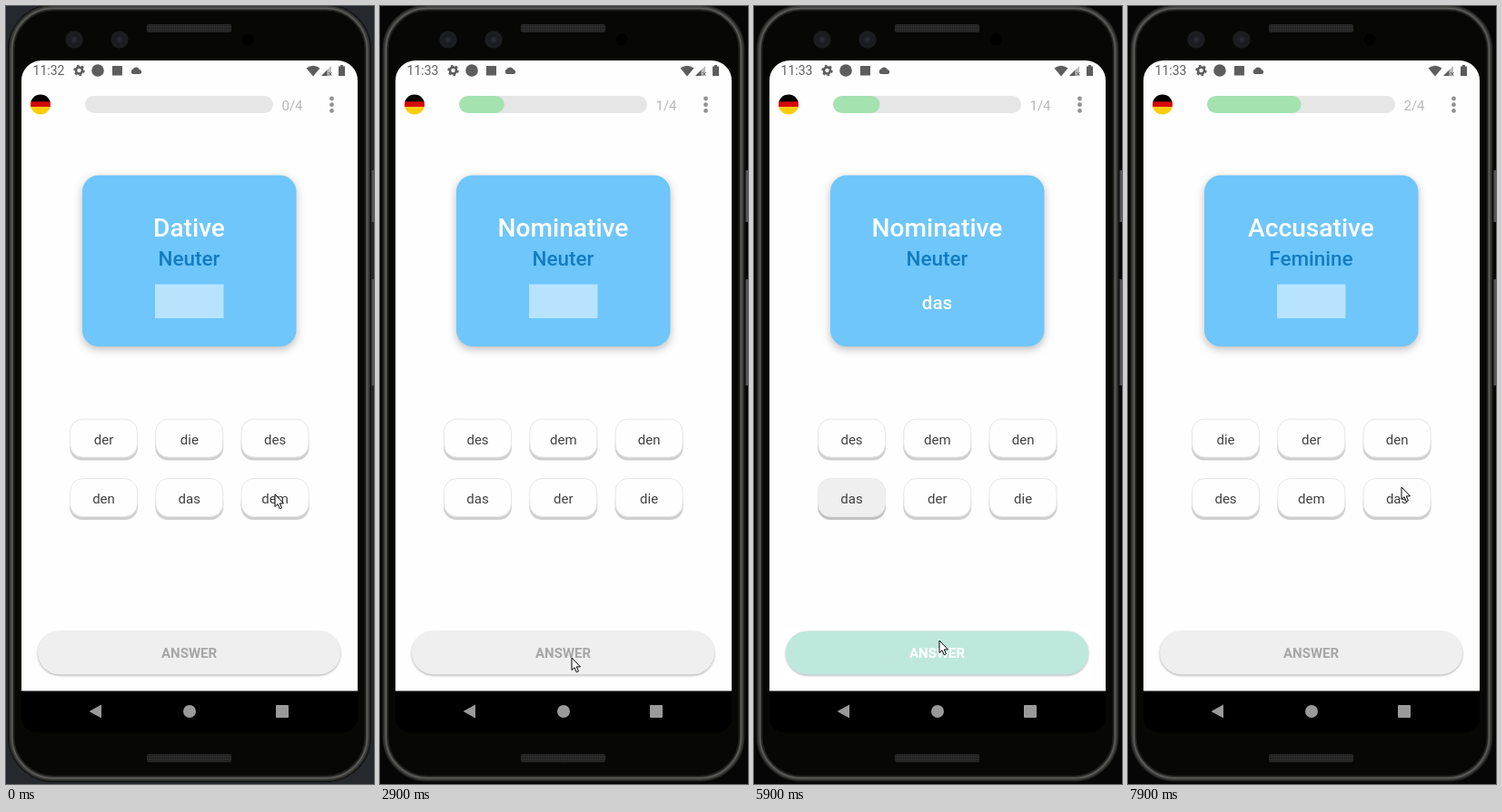
Write an HTML page that moves like this. It is 405 px wide and 857 px high and loops after 8 s.

```html
<!DOCTYPE html>
<html lang="en">
<head>
<meta charset="utf-8">
<title>Article quiz</title>
<style>
html, body { margin: 0; height: 100%; overflow: hidden; background: #060606; }
svg { display: block; width: 405px; height: 857px; }
text { font-family: Roboto, sans-serif; font-size: 15px; text-anchor: middle; }
.case { font-size: 28.1px; font-weight: 500; fill: #fff; }
.gender { font-size: 22.5px; font-weight: 500; fill: #137cc1; }
.reply { font-size: 20.6px; font-weight: 500; fill: #fff; }
.cta { font-weight: 700; fill: #fff; }
.idle { fill: #a6a6a6; }
.note { font-size: 18.7px; font-weight: 500; fill: #419781; text-anchor: start; }
.clock { font-size: 14px; fill: #606060; }
.count { fill: #b8b8b8; }
.label { fill: #404040; }
.slot { fill: #b7e3fd; }
.edge { fill: #cfcfcf; }
.face { fill: #fefefe; stroke: #e6e6e6; }
.picked .edge { fill: #c2c2c2; }
.picked .face { fill: #efefef; stroke: #ebebeb; }
.veil { fill: #fefefe; fill-opacity: 0; }
.card { filter: drop-shadow(0 3px 5px #0004); }
.lift { filter: drop-shadow(0 1.5px 1px #0005); }
.rim { fill: none; }

/* One loop is 8 s: 1.25% = 100 ms */
.cut { animation: 8s step-end infinite; }
.run { animation: 8s linear infinite; }

.backdrop { animation-name: backdrop; }
.q1 { animation-name: q1; }
.q2 { animation-name: q2; }
.q3 { animation-name: q3; }
.open1 { animation-name: open1; }
.done1 { animation-name: done1; }
.open2 { animation-name: open2; }
.done2 { animation-name: done2; }
.ready { animation-name: ready; }
.panel { animation-name: panel; }
.early { animation-name: early; }
.late { animation-name: late; }
.mid { animation-name: mid; }
.last { animation-name: last; }
.press1 { animation-name: press1; }
.press2 { animation-name: press2; }
.submit { animation-name: submit; }
.fill { animation-name: fill; }
.cursor { animation-name: cursor; }

@keyframes backdrop { 0% { fill: #25282c; } 10%, 100% { fill: #060606; } }
@keyframes q1 { 0% { visibility: visible; } 34.375%, 100% { visibility: hidden; } }
@keyframes q2 {
  0% { visibility: hidden; }
  34.375% { visibility: visible; }
  84.375%, 100% { visibility: hidden; }
}
@keyframes q3 { 0% { visibility: hidden; } 84.375%, 100% { visibility: visible; } }
@keyframes open1 { 0% { visibility: visible; } 11.875%, 100% { visibility: hidden; } }
@keyframes done1 {
  0% { visibility: hidden; }
  11.875% { visibility: visible; }
  34.375%, 100% { visibility: hidden; }
}
@keyframes open2 {
  0% { visibility: hidden; }
  34.375% { visibility: visible; }
  63.125%, 100% { visibility: hidden; }
}
@keyframes done2 {
  0% { visibility: hidden; }
  63.125% { visibility: visible; }
  84.375%, 100% { visibility: hidden; }
}
@keyframes ready {
  0%, 33.75% { visibility: hidden; }
  11.875%, 63.125% { visibility: visible; }
  83.75%, 100% { visibility: hidden; }
}
@keyframes panel {
  0%, 33.75% { visibility: hidden; }
  26.25%, 74.375% { visibility: visible; }
  83.75%, 100% { visibility: hidden; }
}
@keyframes early { 0% { visibility: visible; } 26.25%, 100% { visibility: hidden; } }
@keyframes late { 0% { visibility: hidden; } 26.25%, 100% { visibility: visible; } }
@keyframes mid {
  0% { visibility: hidden; }
  26.25% { visibility: visible; }
  74.375%, 100% { visibility: hidden; }
}
@keyframes last { 0% { visibility: hidden; } 74.375%, 100% { visibility: visible; } }
@keyframes press1 {
  0%, 9.375% { fill-opacity: 0; }
  11.25%, 12.5% { fill-opacity: .8; }
  15.625%, 100% { fill-opacity: 0; }
}
@keyframes press2 {
  0%, 60.625% { fill-opacity: 0; }
  62.5%, 63.5% { fill-opacity: .77; }
  66.25%, 100% { fill-opacity: 0; }
}
@keyframes submit {
  0%, 22.6% { fill-opacity: 0; }
  25%, 26.25% { fill-opacity: .7; }
  26.3%, 72.6% { fill-opacity: 0; }
  74.375% { fill-opacity: .7; }
  74.5%, 100% { fill-opacity: 0; }
}
@keyframes fill {
  0%, 26.25% { width: 0; }
  27.5% { width: 5px; }
  30% { width: 23px; }
  32.5% { width: 38.5px; }
  35% { width: 48px; }
  37.5%, 74.375% { width: 51.5px; }
  76.25% { width: 60px; }
  78.75% { width: 82px; }
  81.25% { width: 95px; }
  85% { width: 101.5px; }
  88.75%, 100% { width: 103.5px; }
}
@keyframes cursor {
  0%, 13.75% { transform: translate(296px, 538px); }
  16.25% { transform: translate(257px, 625px); }
  18.75% { transform: translate(220px, 698px); }
  20% { transform: translate(222px, 711px); }
  21.25%, 41.25% { transform: translate(211px, 718px); }
  43.75% { transform: translate(226px, 645px); }
  45% { transform: translate(231px, 590px); }
  46.25% { transform: translate(216px, 553px); }
  47.5% { transform: translate(194px, 533px); }
  50% { transform: translate(131px, 499px); }
  52.5% { transform: translate(93px, 483px); }
  53.75%, 55% { transform: translate(93px, 490px); }
  57.5% { transform: translate(104px, 544px); }
  58.75%, 63.75% { transform: translate(107px, 554px); }
  66.25%, 67.5% { transform: translate(213px, 667px); }
  68.75%, 92.5% { transform: translate(204px, 699px); }
  95% { transform: translate(228px, 657px); }
  97.5% { transform: translate(286px, 556px); }
  98.75%, 100% { transform: translate(301px, 530px); }
}
</style>
</head>
<body>
<svg viewBox="0 0 405 857">
  <defs>
    <pattern id="mesh" width="2" height="3" patternUnits="userSpaceOnUse">
      <rect width="2" height="3" fill="#303030"/><path d="M0 0H2M0 0V3" stroke="#171717"/>
    </pattern>
    <radialGradient id="lens">
      <stop stop-color="#30323a"/><stop offset=".45" stop-color="#1a1b1f"/>
      <stop offset=".9" stop-color="#1d1e22"/><stop offset="1" stop-color="#0c0c0c"/>
    </radialGradient>
    <clipPath id="flag"><circle cx="38" cy="108.5" r="11"/></clipPath>
    <clipPath id="track"><rect x="87" y="99" width="207" height="19" rx="9.5"/></clipPath>
  </defs>

  <!-- Phone -->
  <rect class="cut backdrop" width="405" height="857"/>
  <path d="M404 181V238M404 301V418" stroke="#55575a" stroke-width="3"/>
  <rect x="2" y="-2" width="400" height="857" rx="50" fill="#060606"/>
  <g class="rim">
    <rect x="6" y="2" width="392" height="849" rx="46" stroke="#1f1f1e" stroke-width="7"/>
    <rect x="6" y="2" width="392" height="849" rx="46" stroke="#3c3c3a" stroke-width="4"/>
    <rect x="6.5" y="2.5" width="391" height="848" rx="45.5" stroke="#5c5c5a" stroke-width="1.5"/>
  </g>
  <rect x="10" y="6" width="384" height="841" rx="42" fill="#070706"/>
  <rect x="155" y="20" width="93" height="9" rx="2" fill="url(#mesh)"/>
  <rect x="155" y="824" width="93" height="9" rx="2" fill="url(#mesh)"/>
  <circle cx="75" cy="37" r="10" fill="url(#lens)"/>
  <circle cx="125" cy="37" r="10" fill="url(#lens)"/>
  <circle cx="266" cy="37" r="6.5" fill="#000"/>

  <!-- Screen -->
  <path d="M17 755V82A22 22 0 0 1 39 60H365A22 22 0 0 1 387 82V755Z" fill="#fefefe"/>
  <path d="M17 754.5H387V784A16 16 0 0 1 371 800H33A16 16 0 0 1 17 784Z" fill="#000"/>
  <g fill="#9a9a9a">
    <path d="M91.5 777L105 769.5V784.5Z"/>
    <circle cx="202" cy="777" r="7"/><rect x="297" y="770" width="14" height="14" rx="1"/>
  </g>

  <!-- Status bar -->
  <text class="clock cut early" x="47" y="76">11:32</text>
  <text class="clock cut late" x="47" y="76">11:33</text>
  <g fill="#5d5d5d">
    <g fill="none" stroke="#5d5d5d">
      <circle cx="80.5" cy="71" r="3.5" stroke-width="2.6"/>
      <circle cx="80.5" cy="71" r="5.2" stroke-width="2" stroke-dasharray="2.7" pathLength="32.4"/>
    </g>
    <circle cx="101" cy="71" r="6.8"/>
    <rect x="117" y="66" width="11" height="10.5"/>
    <path d="M139.5 75A3 3 0 0 1 139.6 69.5A4.2 4.2 0 0 1 147 70A2.6 2.6 0 0 1 147.5 75Z"/>
    <path d="M330.5 68.5Q338 63 345.5 68.5L338 77.5Z"/>
    <path d="M347 77L358 66V77Z" fill="#bcbcbc"/><path d="M347 77L353.5 70.5V77Z"/>
    <path d="M355 73L358.5 76.5M358.5 73L355 76.5" stroke="#5d5d5d"/>
    <path d="M366 66.5H368V65H371V66.5H373V77H366Z"/>
  </g>

  <!-- Header -->
  <g clip-path="url(#flag)">
    <rect x="27" y="97" width="22" height="9"/>
    <rect x="27" y="105.3" width="22" height="6" fill="#d40808"/>
    <rect x="27" y="111.2" width="22" height="9" fill="#ffcd0a"/>
  </g>
  <g clip-path="url(#track)">
    <rect x="87" y="99" width="207" height="19" fill="#e6e6e6"/>
    <rect class="run fill" x="87" y="99" width="0" height="19" rx="9.5" fill="#a4e2b0"/>
  </g>
  <text class="count cut early" x="315" y="115">0/4</text>
  <text class="count cut mid" x="315" y="115">1/4</text>
  <text class="count cut last" x="315" y="115">2/4</text>
  <g fill="#929292">
    <circle cx="358.5" cy="102" r="2.4"/><circle cx="358.5" cy="108.7" r="2.4"/><circle cx="358.5" cy="115.4" r="2.4"/>
  </g>

  <rect class="card" x="84" y="186.5" width="235.5" height="188.5" rx="18" fill="#6ec6fb"/>
  <g id="quiz"></g>

  <!-- Footer -->
  <rect class="lift" x="35" y="688.5" width="333" height="48" rx="24" fill="#efefef"/>
  <text class="cta idle" x="201.5" y="718">ANSWER</text>
  <g class="cut ready">
    <rect class="lift" x="35" y="688.5" width="333" height="48" rx="24" fill="#88d4bf"/>
    <text class="cta" x="201.5" y="718">ANSWER</text>
    <rect class="veil run submit" x="32" y="685" width="339" height="57"/>
  </g>
  <g class="cut panel">
    <rect x="17" y="638.5" width="370" height="116" fill="#88d4bf"/>
    <text class="note" x="36" y="668">Correct!</text>
    <rect class="lift" x="35" y="688.5" width="333" height="48" rx="24" fill="#88d4bf"/>
    <text class="cta" x="201.5" y="718">NEXT</text>
  </g>

  <path class="run cursor" d="M0 0V13.5L3 10.7L5.3 15.8L7.5 14.8L5.3 9.9H9.5Z" fill="#fff" stroke="#000"/>
</svg>
<script>
const questions = [
  { name: 'Dative', gender: 'Neuter', options: ['der', 'die', 'des', 'den', 'das', 'dem'], pick: 'dem' },
  { name: 'Nominative', gender: 'Neuter', options: ['des', 'dem', 'den', 'das', 'der', 'die'], pick: 'das' },
  { name: 'Accusative', gender: 'Feminine', options: ['die', 'der', 'den', 'des', 'dem', 'das'] }
];

const text = (cls, y, s) => `<text class="${cls}" x="201.5" y="${y}">${s}</text>`;

const button = (label, cls = '') => `<g class="${cls}">
  <rect class="edge" x="0" y="12" width="75" height="34" rx="14"/>
  <rect class="face" x=".5" y=".5" width="74" height="42" rx="14"/>
  <text class="label" x="37.5" y="28">${label}</text></g>`;

function option(label, i, pick, n) {
  const x = 70 + i % 3 * 94.3, y = i < 3 ? 454.5 : 520;
  const body = label === pick
    ? button(label, 'cut open' + n) + button(label, 'picked cut done' + n) +
      `<rect class="veil run press${n}" x="-1" y="-1" width="77" height="48"/>`
    : button(label);
  return `<g transform="translate(${x} ${y})">${body}</g>`;
}

document.getElementById('quiz').innerHTML = questions.map((q, i) => {
  const n = i + 1;
  return `<g class="cut q${n}">
    ${text('case', 254, q.name)}${text('gender', 286, q.gender)}
    <rect class="slot ${q.pick ? 'cut open' + n : ''}" x="164" y="306.5" width="75.5" height="37.5"/>
    ${q.pick ? text('reply cut done' + n, 333.5, q.pick) : ''}
    ${q.options.map((o, k) => option(o, k, q.pick, n)).join('')}</g>`;
}).join('');
</script>
</body>
</html>
```
